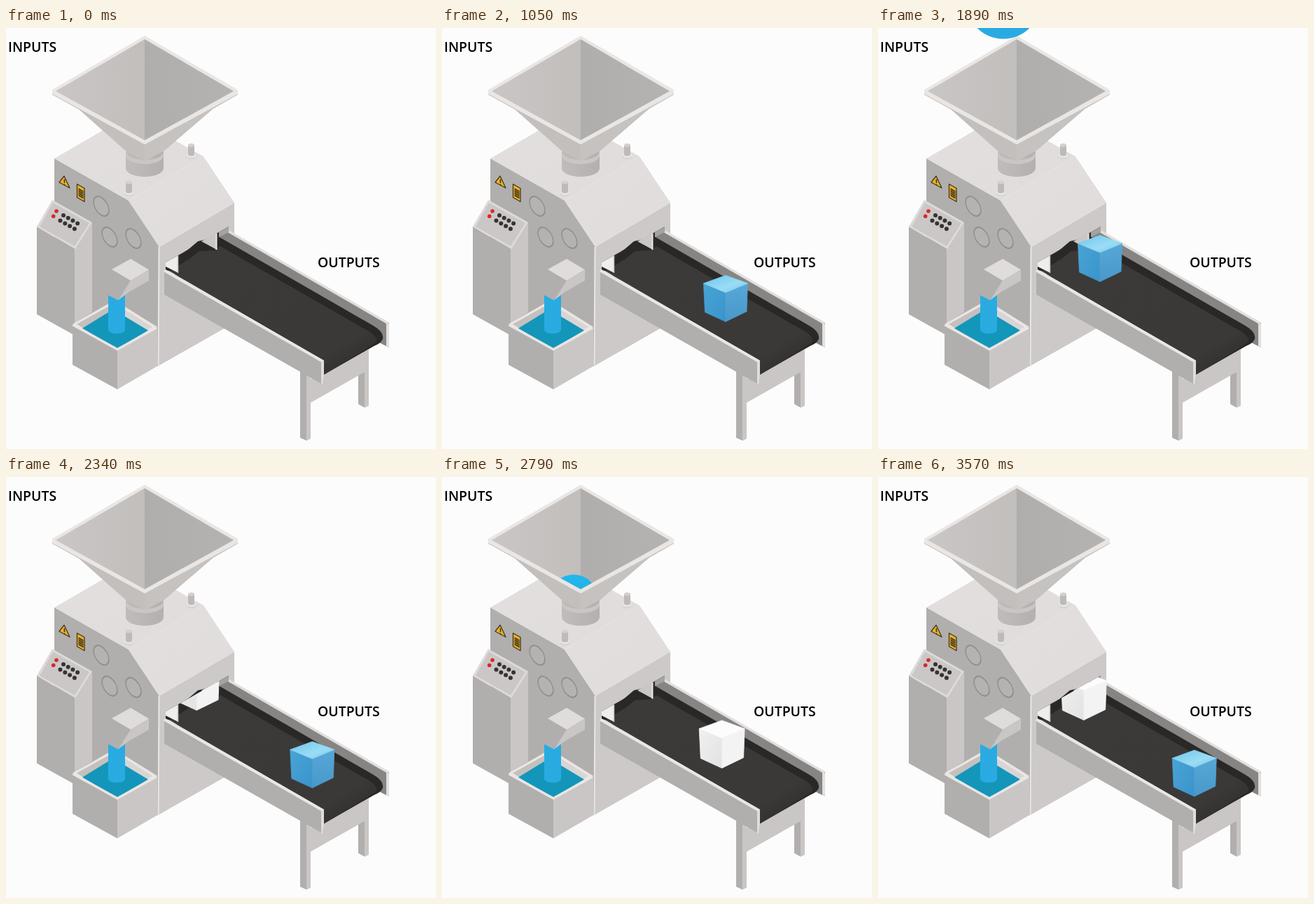
An HTML page for the animation above (3.6 s loop, 614 px wide and 600 px high).

```html
<!DOCTYPE html>
<html lang="en">
<head>
<meta charset="utf-8">
<title>Inputs and outputs</title>
<style>
html, body { margin: 0; width: 100%; height: 100%; overflow: hidden; background: #fcfcfc; }
svg { display: block; width: 614px; height: 600px; }
text { font: 600 19.4px "Open Sans", sans-serif; fill: #000; }
</style>
</head>
<body>
<svg id="stage" viewBox="0 0 614 600">
  <defs>
    <linearGradient id="wallL"><stop offset="0" stop-color="#c9c6c5"/><stop offset="1" stop-color="#c1bebc"/></linearGradient>
    <linearGradient id="wallR"><stop offset="0" stop-color="#b0aeac"/><stop offset="1" stop-color="#b5b3b1"/></linearGradient>
    <linearGradient id="neck"><stop offset="0" stop-color="#bfbcba"/><stop offset="1" stop-color="#b3b0af"/></linearGradient>
    <linearGradient id="roof" x2="1" y2="1"><stop offset="0" stop-color="#e3dfde"/><stop offset="1" stop-color="#e0dcdb"/></linearGradient>
    <linearGradient id="belt" x2="1" y2="1"><stop offset="0" stop-color="#3c3a39"/><stop offset=".8" stop-color="#3b3938"/><stop offset="1" stop-color="#2b2928"/></linearGradient>
    <linearGradient id="ball" x2="0" y2="1"><stop offset="0" stop-color="#20b9ec"/><stop offset=".5" stop-color="#29abe2"/></linearGradient>
    <linearGradient id="blueTop" x2="1" y2="1"><stop offset="0" stop-color="#6cc6ec"/><stop offset=".6" stop-color="#9bdcf5"/><stop offset="1" stop-color="#74c8ec"/></linearGradient>
    <linearGradient id="blueL" x2="1" y2="1"><stop offset="0" stop-color="#49a4d5"/><stop offset="1" stop-color="#3a94cb"/></linearGradient>
    <linearGradient id="blueR" x2="0" y2="1"><stop offset="0" stop-color="#57a7d6"/><stop offset="1" stop-color="#4899cb"/></linearGradient>
    <linearGradient id="whiteL" x2="1" y2="1"><stop offset="0" stop-color="#f0f0f0"/><stop offset="1" stop-color="#e2e2e2"/></linearGradient>
    <clipPath id="bowl"><path d="M71 0V91L198 160 325 91V0Z"/></clipPath>
    <clipPath id="mouth"><path d="M246 324L318 283V0H614V600H246Z"/></clipPath>
  </defs>
  <g id="machine"></g>
  <g id="balls" clip-path="url(#bowl)"></g>
  <g id="rim"></g>
  <g id="cubes" clip-path="url(#mouth)"></g>
  <text x="3" y="34">INPUTS</text>
  <text x="445" y="341">OUTPUTS</text>
</svg>
<script>
const NS = "http://www.w3.org/2000/svg";
const $ = id => document.getElementById(id);

function add(parent, tag, attrs) {
  const el = document.createElementNS(NS, tag);
  for (const k in attrs) el.setAttribute(k, attrs[k]);
  parent.appendChild(el);
  return el;
}

const machine = $("machine");
const path = (d, fill, extra) => add(machine, "path", { d, fill, ...extra });
const line = (d, stroke, width, parent = machine) =>
  add(parent, "path", { d, fill: "none", stroke, "stroke-width": width });
const oval = (cx, cy, rx, ry, fill) => add(machine, "ellipse", { cx, cy, rx, ry, fill });

const LIGHT = "#e9e6e4", MID = "#cac6c5", SHADE = "#b1afad";

function drawBody() {
  path("M69 186L176 124 282 183 175 246Z", "url(#roof)");
  path("M69 186L175 246 219 312 217 482 69 400Z", SHADE);
  path("M219 312L326 249V420L217 482Z", "#cdc9c8");
  path("M175 246L282 183 326 249 219 312Z", "url(#roof)");
  line("M218.500 312L217.500 481", LIGHT, 2);
}

function drawConveyor() {
  // legs and cross beam
  path("M503 480L518 472V538L512 541 503 536Z", SHADE);
  path("M512 490L518 486V538L512 541Z", MID);
  path("M435 500L518 458V487L435 534Z", MID);
  path("M420 486L435 494V585L429 588 420 584Z", SHADE);
  path("M429 496L435 494V585L429 588Z", MID);
  // mouth and back wall
  path("M228 334L318 283V310L250 350 228 345Z", "#2d2b2a");
  path("M318 290L547 421V455L538 451 300 315 302 298Z", "#878584");
  // belt
  path("M228 343L274 304 303 297 524 424Q540 433 538 443 536 449 526 453L454 494V474Z", "#2a2827");
  path("M234 346L262 329 276 318 298 317 306 311 512 429Q531 438 529 448L454 494V474L246 354Z", "url(#belt)");
  line("M318 290L546 421", "#e2dfdd", 3.5);
  path("M543 420L547 422V455L543 453Z", "#e2dfdd");
  // flaps in the mouth
  path("M228 334L246 324V349L228 340Z", "#f0eeed");
  line("M245.500 325V349", MID, 1.5);
  path("M279 304L301 292V316Z", MID);
  line("M300.500 293V316", LIGHT, 2);
  path("M304 291L318 283V291L304 298Z", "#a5a2a1");
  // front wall
  path("M226 345L452 475V508L226 380Z", SHADE);
  line("M226 345.500L453 475.500", LIGHT, 4);
  path("M450 475L454 474V494L452 508H450Z", "#dfdcda");
}

function drawNeck() {
  path("M171 176V200A27 12 0 0 0 225 200V176Z", "url(#neck)");
  path("M171 176A27 12 0 0 0 225 176V182A27 12 0 0 1 171 182Z", MID);
}

function drawHopper() {
  path("M66 91L198 163V190L172 176 104 116 66 95Z", "#c2bfbd");
  path("M331 91L198 163V190L226 175 296 115 331 95Z", "#c5c2c0");
  path("M66 88L198 11 331 88V94L198 166 66 94Z", LIGHT);
  path("M71 90L198 16V160Z", "url(#wallL)");
  path("M325 90L198 16V160Z", "url(#wallR)");
  line("M67 91L198 162.500 330 91", LIGHT, 4, $("rim"));
}

function drawPeg(x, y) {
  oval(x, y + 18, 7, 4, "#d6d2d1");
  oval(x, y + 16.5, 6.5, 3.5, "#eae7e5");
  path(`M${x - 4.5} ${y + 2}V${y + 15}a4.5 2.5 0 0 0 9 0V${y + 2}Z`, "#bdbab9");
  oval(x, y + 2, 4.5, 2.5, "#d3d0cf");
}

function drawSigns() {
  const ink = { stroke: "#3c3527", "stroke-width": 1.3, "stroke-linejoin": "round" };
  path("M83 211L91 228 76 220Z", "#f0b323", ink);
  line("M83.400 215.500V221M83.600 222.500V224", "#3c3527", 1.6);
  path("M101.500 222.500L112 228.500V247.500L101.500 241.500Z", "#f0b323", ink);
  path("M103.500 228L110.500 232V243.500L103.500 239.500Z", "#51431f");
  for (let i = 0; i < 3; i++) line(`M104 ${231 + i * 3}l6 3.400`, "#c8962a", .7);
  for (const [x, y] of [[136, 254], [148, 298], [182, 300]])
    add(machine, "circle", {
      r: 12.5, fill: "#b5b3b1", stroke: "#918f8d", "stroke-width": 1.8,
      transform: `translate(${x} ${y}) skewY(29) scale(.87 1)`
    });
}

function drawCabinet() {
  path("M44 283L98 315V438L44 408Z", SHADE);
  path("M98 315L123 277V405L98 421Z", MID);
  path("M66 245L123 277 99 315 44 283Z", "#dedad9");
  path("M67 249L119 278 98 311 48 283Z", "#cbc7c6");
  oval(72, 261, 2.8, 2.8, "#d6292f");
  oval(67.7, 268.3, 2.8, 2.8, "#d6292f");
  for (let i = 0; i < 4; i++) {
    oval(82 + i * 6.7, 267 + i * 3.8, 3, 3, "#363433");
    oval(77.5 + i * 6.8, 274.5 + i * 3.9, 3, 3, "#363433");
  }
}

function drawBasin() {
  path("M95 422L155 388 216 426 159 459Z", LIGHT);
  path("M101 422L155 392V456Z", "#c3c0be");
  path("M155 392L209 426 159 455 155 456Z", "#d9d5d4");
  path("M109 428L153 401 203 431 159 457Z", "#1496ba");
  path("M95 422L159 457V515L95 480Z", SHADE);
  path("M159 457L216 426V482L159 515Z", MID);
  line("M95.500 423L159 458 215 427", LIGHT, 3.5);
  path("M146 376V430A12 5.500 0 0 0 170 430V376Z", "#29abe2");
  path("M151 344L178 360 160 388 133 374Z", SHADE);
  path("M178 360L204 345V360L176 376 160 388Z", MID);
  path("M178 329L204 344.500 178 360 151 344Z", "#e0dcdb");
}

drawBody();
drawConveyor();
drawNeck();
drawHopper();
drawPeg(264.5, 165);
drawPeg(175.5, 218);
drawSigns();
drawCabinet();
drawBasin();

const LOOP = 3600, STEP = 30;
// start time and cube kind of each item
const ITEMS = [[0, "blue"], [1165, "blue"], [1760, "white"], [2343, "blue"], [2922, "white"]];
// cube course: time, right edge, lowest point
const COURSE = [
  [450, 262, 307], [570, 301, 331], [725, 349, 362], [1050, 437, 419], [1172, 468.5, 443],
  [1228, 484, 456], [1330, 506, 487], [1430, 520, 540], [1560, 528, 668]
];
const SKINS = {
  blue: { top: "url(#blueTop)", left: "url(#blueL)", right: "url(#blueR)", scale: 1 },
  white: { top: "#fcfcfc", left: "url(#whiteL)", right: "#f3f3f3", scale: 1.03 }
};

function makeCube(kind) {
  const skin = SKINS[kind], g = add($("cubes"), "g", {});
  const face = (d, fill) =>
    add(g, "path", { d, fill, stroke: fill, "stroke-width": .8, "stroke-linejoin": "round" });
  face("M-31.500 -55L0 -42V-.5L-29.500 -14Z", skin.left);
  face("M31.500 -55L0 -42V-.5L30 -15Z", skin.right);
  face("M0 -66.500L31.500 -55 0 -42 -31.500 -55Z", skin.top);
  return g;
}

const items = ITEMS.map(([start, kind]) => ({
  start,
  scale: SKINS[kind].scale,
  cube: makeCube(kind),
  ball: add($("balls"), "circle", { fill: "url(#ball)" })
}));

const slope = (i, k) => {
  const a = COURSE[Math.max(i - 1, 0)], b = COURSE[Math.min(i + 1, COURSE.length - 1)];
  return (b[k] - a[k]) / (b[0] - a[0]);
};

// smooth curve through the course points
function along(t, k) {
  let i = 0;
  while (i < COURSE.length - 2 && t > COURSE[i + 1][0]) i++;
  const a = COURSE[i], b = COURSE[i + 1], h = b[0] - a[0], s = (t - a[0]) / h, r = 1 - s;
  return r * r * ((1 + 2 * s) * a[k] + s * h * slope(i, k)) +
         s * s * ((3 - 2 * s) * b[k] - r * h * slope(i + 1, k));
}

function show(el, on) {
  el.setAttribute("visibility", on ? "visible" : "hidden");
  return on;
}

function render(time) {
  const now = Math.floor((time % LOOP) / STEP) * STEP;
  for (const { start, scale, cube, ball } of items) {
    const t = now - start;
    if (show(ball, t > 95 && t < 500)) {
      const p = (t - 130) / 317;
      ball.setAttribute("cx", 179 + 9 * p);
      ball.setAttribute("cy", -37.5 + 210.5 * p);
      ball.setAttribute("r", 53 - 19 * p);
    }
    if (show(cube, t >= COURSE[0][0] && t <= COURSE[COURSE.length - 1][0]))
      cube.setAttribute("transform", `translate(${along(t, 1) - 32} ${along(t, 2)}) scale(${scale})`);
  }
}

const begin = performance.now();
function tick() {
  render(performance.now() - begin);
  requestAnimationFrame(tick);
}
tick();
</script>
</body>
</html>
```
